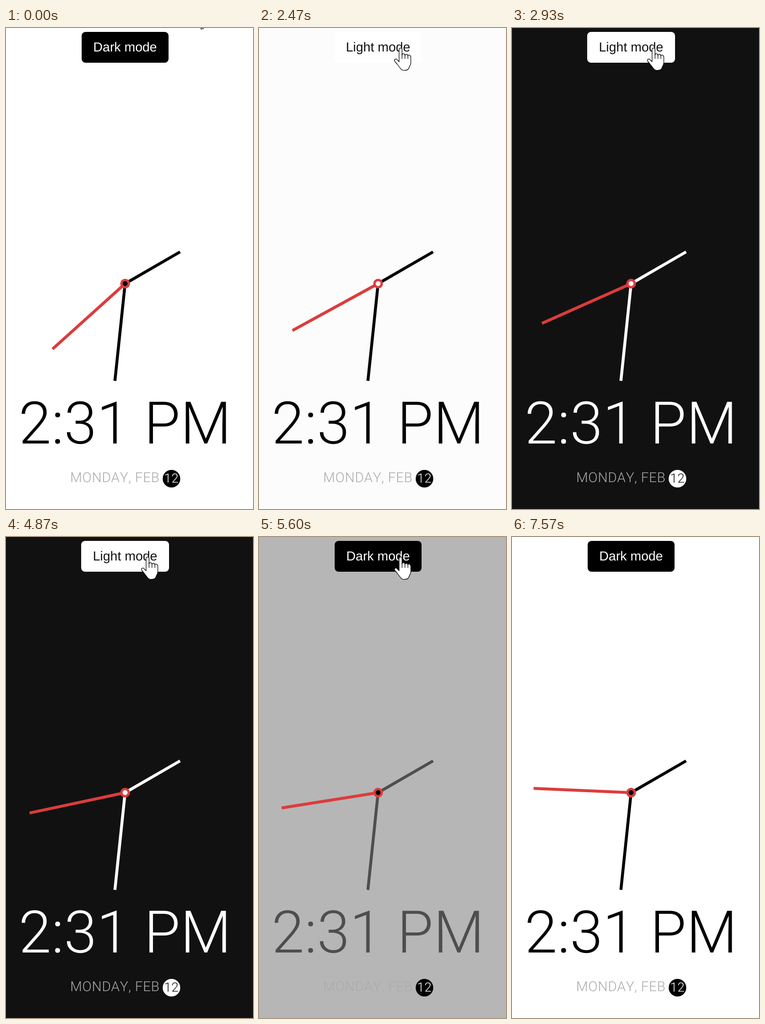
Animation of 506 by 984 pixels, one loop 7610 ms. Source, as an HTML page:

```html
<!DOCTYPE html>
<html lang="en">
<head>
<meta charset="utf-8">
<title>Theme clock</title>
<style>
  html, body { margin: 0; width: 100%; height: 100%; overflow: hidden; }
  svg { display: block; width: 506px; height: 984px; }
  text {
    font-family: Roboto, sans-serif; font-weight: 300;
    font-kerning: none; text-rendering: geometricPrecision;
  }
  .mid { text-anchor: middle; }
  #label { font: 26.67px "Liberation Sans", Arial, sans-serif; }
  .hand { stroke-width: 6; }
</style>
</head>
<body>
<svg viewBox="0 0 506 984">
  <rect id="page" width="506" height="984"/>
  <rect id="button" y="8" height="63" rx="8"/>
  <text id="label" class="mid" x="244" y="48"></text>

  <g transform="translate(244 523)">
    <g id="hands">
      <path class="hand" d="M0 0V-130" transform="rotate(60)"/>
      <path class="hand" d="M0 0V-200" transform="rotate(186)"/>
    </g>
    <path id="second" class="hand" d="M0 0V-200" stroke="#dc3c3c"/>
    <circle r="10" fill="#dc3c3c"/>
    <circle id="dot" r="5"/>
  </g>

  <text id="time" class="mid" x="244" y="850" font-size="120" letter-spacing=".6">2:31 PM</text>
  <text x="131.5" y="929" font-size="28" letter-spacing=".6" fill="#aaa">MONDAY, FEB</text>
  <circle id="badge" cx="339" cy="922" r="18"/>
  <text id="day" class="mid" x="339" y="930" font-size="26" letter-spacing=".6">12</text>

  <g id="cursor" fill="#fff" stroke="#000" stroke-width="1.2" stroke-linejoin="round">
    <path id="arrow" d="M0 0V35L7.5 28L13 39.5L18.5 37L13.5 25.5H25Z"/>
    <g id="pointer">
      <path d="M-3 3C-3-1 3-1 3 3V14C4 10 9 11 9 15C10 12 15 12 15 16C16 13 21 14 21 19V30
               C21 35 18 37 17 41C15 47 3 47 0 42L-7 33L-12 27C-14 23-9 21-7 24L-3 28Z"/>
      <path d="M3 13V22M9 15V22M15 16V22" fill="none"/>
    </g>
  </g>
</svg>
<script>
const LOOP = 7610, FADE = 500;
const TO_DARK = 2430, TO_LIGHT = 5200;
const FIRST_TICK = 262, TICK = 1002, START_ANGLE = 228;

const WHITE = 255, DARK = 17, BLACK = 0;

// time, x, y of the mouse tip
const MOUSE = [
  [0, 387, -37], [130, 400, -50], [1170, 392, -45], [1370, 354, -9],
  [1530, 320, 19], [1720, 290, 41], [6450, 290, 41], [6620, 318, 18],
  [6900, 380, -50], [LOOP, 387, -42]
];

const $ = id => document.getElementById(id);
const set = (id, attrs) => {
  for (const key in attrs) $(id).setAttribute(key, attrs[key]);
};
const clamp = v => Math.min(1, Math.max(0, v));
const mix = (a, b, p) => a + (b - a) * p;
const gray = (a, b, p) => {
  const v = Math.round(mix(a, b, p));
  return `rgb(${v},${v},${v})`;
};

// cubic-bezier(.42, 0, 1, 1)
function easeIn(x) {
  if (x <= 0 || x >= 1) return clamp(x);
  let low = 0, high = 1;
  for (let i = 0; i < 20; i++) {
    const s = (low + high) / 2, r = 1 - s;
    if (1.26 * s * r * r + 3 * s * s * r + s * s * s < x) low = s;
    else high = s;
  }
  return low * low * (3 - 2 * low);
}

function secondAngle(t) {
  const since = t - FIRST_TICK;
  if (since < 0) return START_ANGLE;
  const ticks = Math.floor(since / TICK);
  return START_ANGLE + 6 * (ticks + easeIn((since - ticks * TICK) / FADE));
}

function mouseAt(t) {
  const i = MOUSE.findIndex(point => point[0] > t);
  const [t0, x0, y0] = MOUSE[i - 1], [t1, x1, y1] = MOUSE[i];
  const p = (t - t0) / (t1 - t0);
  return [mix(x0, x1, p), mix(y0, y1, p)];
}

function draw(t) {
  const dark = t >= TO_DARK && t < TO_LIGHT;
  const p = t < TO_LIGHT ? easeIn((t - TO_DARK) / FADE) : 1 - easeIn((t - TO_LIGHT) / FADE);
  const page = gray(WHITE, DARK, p), ink = gray(BLACK, WHITE, p);
  const solid = gray(BLACK, WHITE, +dark), inverse = gray(WHITE, DARK, +dark);

  set('page', { fill: page });
  set('hands', { stroke: ink });
  set('time', { fill: ink });
  set('second', { transform: `rotate(${secondAngle(t)})` });
  set('dot', { fill: solid });
  // the badge fades into the dark theme but snaps back to the light one
  set('badge', { fill: dark ? ink : solid });
  set('day', { fill: dark ? page : inverse });

  set('button', { x: dark ? 154 : 155, width: dark ? 180 : 178, fill: solid });
  set('label', { fill: inverse });
  $('label').textContent = dark ? 'Light mode' : 'Dark mode';

  const [x, y] = mouseAt(t);
  const over = x < 333 && y > 8;
  set('cursor', { transform: `translate(${x} ${y})` });
  set('arrow', { visibility: over ? 'hidden' : 'visible' });
  set('pointer', { visibility: over ? 'visible' : 'hidden' });
}

function frame() {
  draw(performance.now() % LOOP);
  requestAnimationFrame(frame);
}
frame();
</script>
</body>
</html>
```
